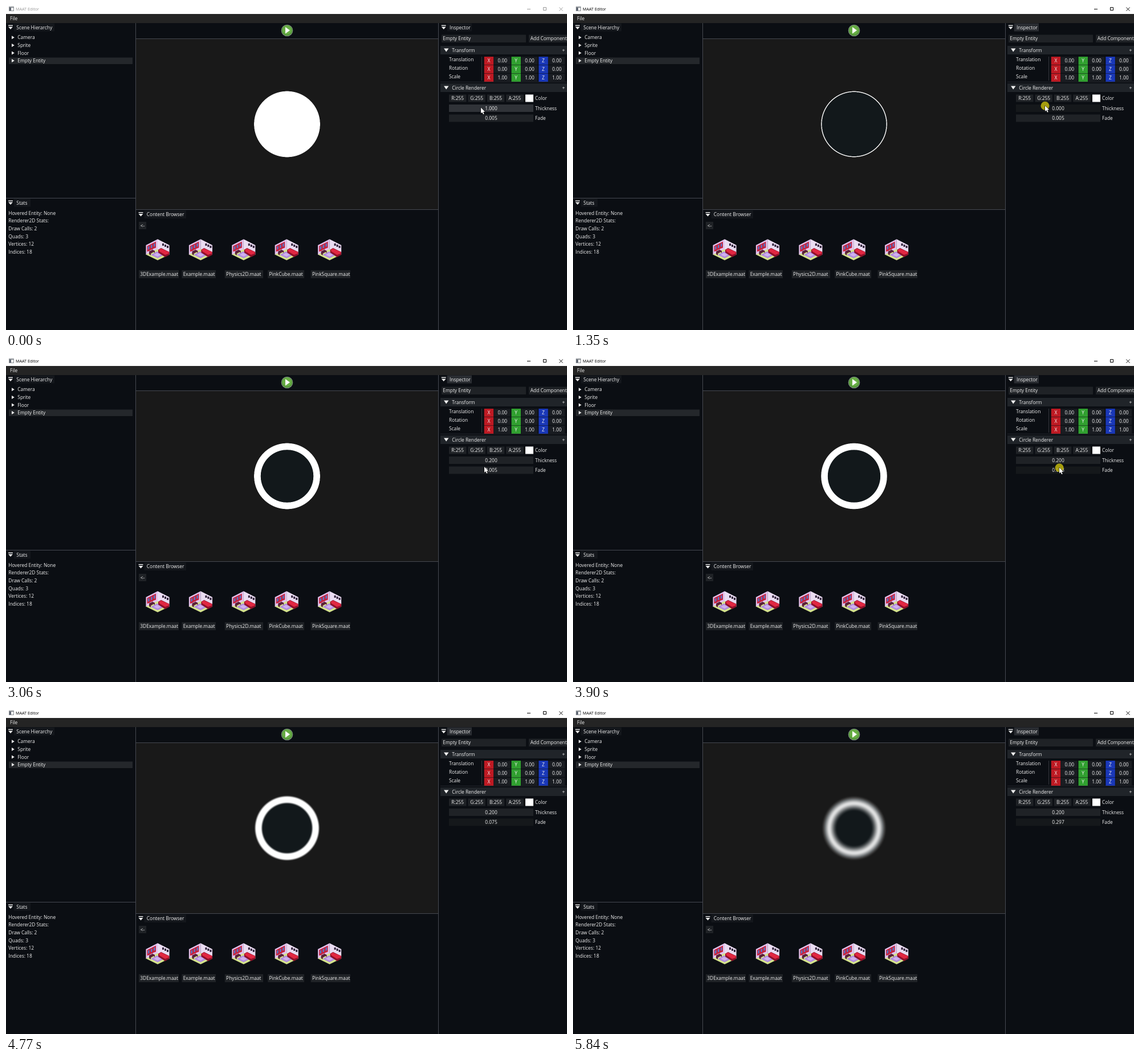
An HTML page with a canvas that plays this animation: 984 by 569 pixels, repeating every 6220 ms.

```html
<!DOCTYPE html>
<html lang="en">
<head>
<meta charset="utf-8">
<title>MAAT Editor</title>
<style>
html, body { margin: 0; width: 100%; height: 100%; overflow: hidden; background: #0b0e13; }
canvas { display: block; }
</style>
</head>
<body>
<canvas id="stage" width="984" height="569"></canvas>
<script>
const ctx = document.getElementById('stage').getContext('2d');
const LOOP = 6220;
const PANEL = '#0b0e13', TAB = '#14171c', FIELD = '#1f2226', HOVER = '#303338',
      ACTIVE = '#15181b', HEADER = '#202429', LINE = '#454850', INK = '#f0f0f0';

// Each track lists [time, value] points, joined by straight lines.
const thicknessTrack = [[1170, 1], [1340, 0], [1740, 0], [1910, .125], [2050, .125], [2135, .2]];
const fadeTrack = [[3750, .005], [4060, .011], [4360, .026], [4440, .029], [4510, .029],
  [5000, .115], [5150, .138], [5220, .142], [5660, .26], [5840, .297]];
const cursorX = [[560, 833], [1170, 854], [1340, 828], [1400, 828], [1530, 824], [1740, 824],
  [1910, 827], [2050, 827], [2135, 829], [2830, 829], [3060, 839], [3100, 839], [3290, 846]];
const cursorY = [[560, 178.5], [1170, 176], [1340, 175], [1910, 174], [2830, 174],
  [3060, 191], [3100, 191], [3290, 193], [3750, 193], [4360, 191]];
const PRESS = 650, RELEASE = 2830, GRAB = 3750;

function at(track, t) {
  if (t <= track[0][0]) return track[0][1];
  for (let i = 1; i < track.length; i++) {
    const [t0, a] = track[i - 1], [t1, b] = track[i];
    if (t < t1) return a + (b - a) * (t - t0) / (t1 - t0);
  }
  return track[track.length - 1][1];
}

function rect(x, y, x2, y2, color) {
  ctx.fillStyle = color;
  ctx.fillRect(x, y, x2 - x, y2 - y);
}

function poly(color, ...p) {
  ctx.fillStyle = color;
  ctx.beginPath();
  for (let i = 0; i < p.length; i += 2) ctx.lineTo(p[i], p[i + 1]);
  ctx.closePath();
  ctx.fill();
}

function disc(x, y, r, color) {
  ctx.fillStyle = color;
  ctx.beginPath();
  ctx.arc(x, y, r, 0, Math.PI * 2);
  ctx.fill();
}

// y is the middle of the capitals
function text(s, x, y, align = 'left', color = INK, size = 8.4) {
  ctx.font = size + 'px "Open Sans", "Noto Sans", sans-serif';
  ctx.textAlign = align;
  ctx.fillStyle = color;
  ctx.fillText(s, x, y + size * .36);
}

function tab(x, y, name, x2, lit) {
  rect(x + 10, y - 7, x2, y + 7, lit ? '#2a2d32' : TAB);
  rect(x, y - 4, x + 8, y - 2.6, INK);
  poly(INK, x, y - 1, x + 8, y - 1, x + 4, y + 3.5);
  text(name, x + 14.3, y);
}

function box(x, y, x2, s, color = FIELD) {
  rect(x, y - 6.5, x2, y + 6.5, color);
  text(s, (x + x2) / 2, y, 'center');
}

function titleBar(active) {
  const ink = active ? '#000' : '#999';
  rect(0, 0, 984, 14, '#fff');
  rect(5, 1, 14, 9, '#8a8f94');
  rect(6, 3, 13, 8, '#f4f4f4');
  rect(6, 3, 9, 8, '#5c6470');
  text('MAAT Editor', 17, 5.5, 'left', ink, 7.2);
  ctx.strokeStyle = ink;
  ctx.lineWidth = 1;
  ctx.beginPath();
  ctx.moveTo(914, 5.5); ctx.lineTo(920, 5.5);
  ctx.rect(942.5, 2.5, 5, 5);
  ctx.moveTo(970.5, 2.5); ctx.lineTo(976.5, 8.5);
  ctx.moveTo(976.5, 2.5); ctx.lineTo(970.5, 8.5);
  ctx.stroke();
  rect(0, 14, 984, 30, '#242424');
  text('File', 7, 22.3);
}

function leftPanels() {
  tab(4, 37.5, 'Scene Hierarchy', 85);
  rect(5, 90.5, 222, 102, '#24272b');
  ['Camera', 'Sprite', 'Floor', 'Empty Entity'].forEach((name, i) => {
    const y = 55.3 + i * 13.6;
    poly(INK, 10, y - 3, 14.8, y, 10, y + 3);
    text(name, 20.3, y);
  });
  rect(0, 337, 227, 338, LINE);
  tab(4, 345.5, 'Stats', 43);
  ['Hovered Entity: None', 'Renderer2D Stats:', 'Draw Calls: 2', 'Quads: 3', 'Vertices: 12', 'Indices: 18']
    .forEach((s, i) => text(s, 4.3, 363.7 + i * 13.6));
}

function room(x, y) {
  ctx.save();
  ctx.translate(x, y);
  poly('#17141c', 0, -19, 21.5, -8, 21.5, 8, 0, 19.5, -21.5, 9, -21.5, -8);
  poly('#e2c3ee', -20.5, -8, 0, -18.5, 0, 0, -20.5, 9);
  poly('#eadcf2', 0, -18.5, 20.5, -8, 20.5, 9, 0, 0);
  poly('#d5e58c', 0, -1, 20.5, 8.5, 0, 18.5, -20.5, 8.5);
  poly('#b28be0', -1, 3, 11, 9, 0, 15, -12, 9);
  poly('#cfb2ee', -1, 5.5, 6, 9, 0, 12, -7, 9);
  for (let i = 0; i < 3; i++) {
    const wx = -17 + i * 5, wy = -6.5 - i * 2.5;
    poly('#c7203a', wx - 1.5, wy, wx + 4, wy - 2.7, wx + 4, wy + 8, wx - 1.5, wy + 10);
    poly('#5878c8', wx, wy + 1, wx + 2.5, wy, wx + 2.5, wy + 5.5, wx, wy + 6.5);
  }
  poly('#5a2038', -15, 3, -9, 0, -5, 2, -5, 6, -7, 4, -12, 7, -12, 10, -15, 8);
  for (let i = 0; i < 3; i++) rect(8 + i * 4, -11 + i * 2, 11 + i * 4, -7 + i * 2, '#33253c');
  poly('#8e1028', 1, 0, 6, -3, 20.5, 4, 20.5, 9, 13, 13, 1, 5);
  poly('#e12742', 2, 0, 6, -2, 20, 4, 19, 7, 13, 9, 3, 3);
  ctx.restore();
}

function contentBrowser() {
  rect(228, 357, 758, 358, LINE);
  tab(232.5, 366, 'Content Browser', 316);
  box(233, 385.5, 246, '<-');
  [['3DExample', 303], ['Example', 368], ['Physics2D', 451], ['PinkCube', 523], ['PinkSquare', 604]]
    .forEach(([name, x2], i) => {
      const x = 233 + i * 75.4;
      room(x + 33, 428);
      rect(x, 464, x2, 478, FIELD);
      text(name + '.maat', x + 2.3, 471);
    });
}

function header(y, name) {
  rect(762, y - 7.5, 984, y + 7.5, HEADER);
  poly(INK, 768, y - 3, 776.5, y - 3, 772.2, y + 3);
  text(name, 782.3, y);
  text('+', 978, y, 'center');
}

function inspector(s) {
  tab(763.7, 37.5, 'Inspector', 817, s.focused);
  rect(764, 50.5, 912, 64, FIELD);
  text('Empty Entity', 766.3, 57.3);
  rect(917, 50.5, 984, 64, FIELD);
  text('Add Component', 919.7, 57.3);
  header(77.5, 'Transform');
  rect(834, 89, 835, 131, '#33363d');
  ['Translation', 'Rotation', 'Scale'].forEach((name, row) => {
    const y = 96.3 + row * 14.8;
    text(name, 777, y - 2);
    ['#be1a23', '#31a030', '#1a38b8'].forEach((color, i) => {
      const x = 838.7 + i * 47.8;
      rect(x, y - 7.3, x + 16.5, y + 7, color);
      text('XYZ'[i], x + 8.2, y, 'center');
      rect(x + 17, y - 7, x + 46, y + 6.5, '#1a1d22');
      text(row === 2 ? '1.00' : '0.00', x + 32, y, 'center');
    });
  });
  rect(762, 133, 984, 134, '#22262c');
  header(143.5, 'Circle Renderer');
  [...'RGBA'].forEach((c, i) => {
    const x = 777 + i * 33.4;
    box(x, 162, x + 30.5, c + ':255');
  });
  rect(911, 155.5, 925, 168.5, '#fff');
  text('Color', 928, 162);
  box(777, 179.5, 925, s.thickness.toFixed(3), s.thicknessColor);
  text('Thickness', 928, 179.5);
  box(777, 197, 925, s.fade.toFixed(3), s.fadeColor);
  text('Fade', 928, 197);
}

function playButton() {
  disc(493, 43, 10.3, '#7f8f83');
  disc(493, 43, 9.3, '#56993a');
  disc(493, 42, 7.8, '#68ad45');
  poly('#fff', 490, 37, 498, 42.7, 490, 48.5);
}

function smooth(a, b, x) {
  const k = Math.min(1, Math.max(0, (x - a) / (b - a)));
  return k * k * (3 - 2 * k);
}

const SIDE = 120, R = 58, CX = 493, CY = 207.5;
const pixels = ctx.createImageData(SIDE, SIDE);
const OUTER = [25, 25, 25], INNER = [18, 24, 27];

function circle(thickness, fade) {
  const x0 = 433, y0 = 148, wide = Math.max(thickness, .024), sub = [.25, .75];
  for (let y = 0; y < SIDE; y++) for (let x = 0; x < SIDE; x++) {
    const sum = [0, 0, 0];
    for (const v of sub) for (const u of sub) {
      const d = 1 - Math.hypot(x0 + x + u - CX, y0 + y + v - CY) / R;
      const a = smooth(0, fade, d) * (1 - smooth(wide, wide + fade, d));
      const back = d > wide / 2 ? INNER : OUTER;
      for (let c = 0; c < 3; c++) sum[c] += back[c] + (255 - back[c]) * a;
    }
    const i = (y * SIDE + x) * 4;
    for (let c = 0; c < 3; c++) pixels.data[i + c] = sum[c] / 4;
    pixels.data[i + 3] = 255;
  }
  ctx.putImageData(pixels, x0, y0);
}

function cursor(x, y, pressed) {
  if (pressed) disc(x, y + .3, 7.5, 'rgba(178,168,14,.92)');
  ctx.save();
  ctx.translate(x, y);
  ctx.strokeStyle = '#000';
  ctx.lineWidth = 1;
  const p = [0, 0, 0, 10, 2.3, 8, 4, 11.8, 5.6, 11, 4, 7.4, 7, 7.2];
  poly('#fff', ...p);
  ctx.stroke();
  poly('#fff', ...p);
  ctx.restore();
}

function draw(t) {
  const thickness = Math.round(at(thicknessTrack, t) * 40) / 40;
  const fade = at(fadeTrack, t);
  const x = at(cursorX, t) + (fade - .005) / .000414;
  const y = at(cursorY, t);
  const pressed = (t >= PRESS && t < RELEASE) || t >= GRAB;
  const focused = t >= PRESS;

  rect(0, 0, 984, 569, PANEL);
  titleBar(focused);
  rect(228, 57, 758, 357, '#191919');
  rect(228, 57, 758, 58, LINE);
  circle(thickness, fade);
  playButton();
  leftPanels();
  contentBrowser();
  inspector({
    focused, thickness, fade,
    thicknessColor: t < PRESS ? HOVER : t < RELEASE ? ACTIVE : y < 186 ? HOVER : FIELD,
    fadeColor: t >= GRAB ? ACTIVE : y > 191.5 ? HOVER : FIELD
  });
  rect(227, 30, 228, 569, LINE);
  rect(758, 30, 759, 569, LINE);
  if (x < 984) cursor(x, y, pressed);
}

const start = performance.now();
function tick() {
  draw((performance.now() - start) % LOOP);
  requestAnimationFrame(tick);
}
tick();
</script>
</body>
</html>
```
